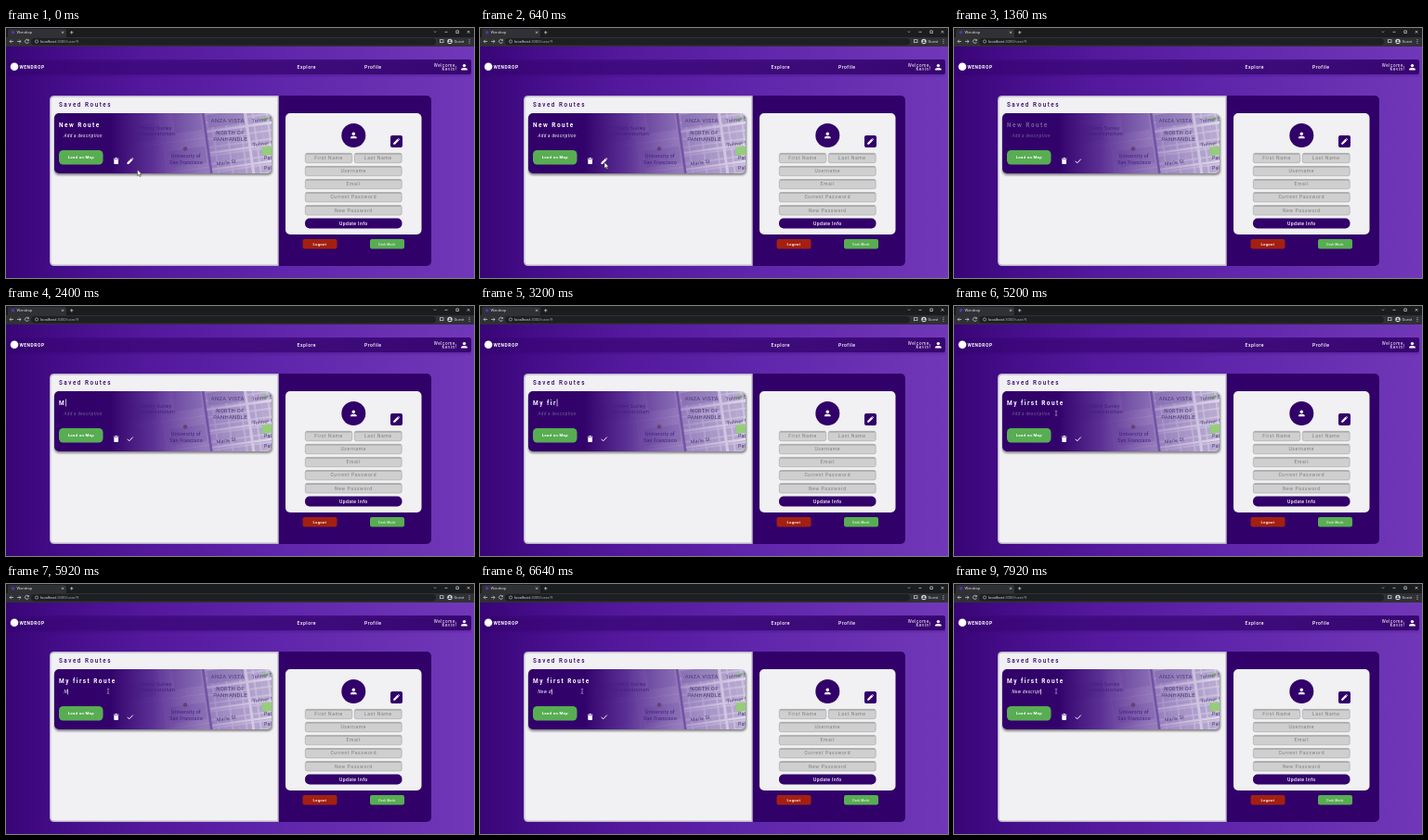
Recreate the animation shown at these times as an HTML page. Size 504 px wide and 270 px high, loop 8 s.

```html
<!DOCTYPE html>
<html lang="en">
<head>
<meta charset="utf-8">
<title>Saved Routes</title>
<style>
  html, body { margin: 0; width: 100%; height: 100%; overflow: hidden; background: #53189c; }
  svg { display: block; width: 100vw; height: 100vh; }
  text { font-family: Roboto, "Open Sans", sans-serif; fill: #fff; white-space: pre; }
  .mid { text-anchor: middle; }
  .bold { font-weight: 700; }
  .chrome { font-size: 4.2px; fill: #d6d7da; }
  .nav { font-size: 5px; font-weight: 500; letter-spacing: .55px; }
  .hello { font-size: 4.5px; letter-spacing: .65px; text-anchor: end; }
  .heading { font-size: 6.3px; font-weight: 500; letter-spacing: 1.55px; fill: #310069; }
  .title { font-size: 6.5px; font-weight: 700; letter-spacing: 1.45px; }
  .desc { font-size: 4.6px; font-style: italic; letter-spacing: .38px; }
  .field { font-size: 5px; letter-spacing: .62px; fill: #7d7d7d; text-anchor: middle; }
  .map text { font-size: 5.3px; letter-spacing: .2px; fill: #4b3a74; }
  .map .area { font-size: 5.9px; letter-spacing: .3px; }
  .map .faint { fill: #42207a; }
  .ghost { fill: #75609a; }
</style>
</head>
<body>
<svg viewBox="0 0 504 270" preserveAspectRatio="none">
  <defs>
    <linearGradient id="page">
      <stop offset="0" stop-color="#380576"/>
      <stop offset=".1" stop-color="#430c87"/>
      <stop offset=".3" stop-color="#53189c"/>
      <stop offset=".6" stop-color="#6026ab"/>
      <stop offset="1" stop-color="#7038b8"/>
    </linearGradient>
    <linearGradient id="bar">
      <stop offset="0" stop-color="#310069" stop-opacity=".2"/>
      <stop offset="1" stop-color="#310069" stop-opacity=".88"/>
    </linearGradient>
    <linearGradient id="fade">
      <stop offset="0" stop-color="#310069"/>
      <stop offset=".26" stop-color="#33036c"/>
      <stop offset=".45" stop-color="#4c1c8b" stop-opacity=".88"/>
      <stop offset=".68" stop-color="#6a43a3" stop-opacity=".56"/>
      <stop offset="1" stop-color="#7d5bb0" stop-opacity=".14"/>
    </linearGradient>
    <pattern id="blocks" width="15" height="9" patternUnits="userSpaceOnUse">
      <rect width="15" height="9" fill="#e6e2ee"/>
      <rect x=".7" y=".7" width="13.6" height="7.6" fill="#c3bad7"/>
      <path d="M7.5 1V8" stroke="#d4cde2" stroke-width=".5"/>
    </pattern>
    <clipPath id="card"><rect x="52" y="92" width="234" height="65" rx="5"/></clipPath>
    <filter id="soft" x="-10%" y="-20%" width="120%" height="150%"><feGaussianBlur stdDeviation="1.3"/></filter>
    <g id="person">
      <circle cy="-1.7" r="1.7"/>
      <path d="M-3.3 3.2V2.2C-3.3 .2 3.3 .2 3.3 2.2V3.2Z"/>
    </g>
    <path id="pencil" d="M-3.2 3.2V1.6L1.2 -2.8L2.8 -1.2L-1.6 3.2ZM1.7 -3.2L2.3 -3.7L3.7 -2.3L3.2 -1.7Z"/>
  </defs>

  <rect y="19" width="504" height="251" fill="url(#page)"/>

  <!-- browser -->
  <rect width="504" height="20" fill="#1b1c1e"/>
  <path d="M2 10V3Q2 1 4 1H63Q65 1 65 3V10H504V20H0V10Z" fill="#303134"/>
  <rect x="27" y="11" width="436" height="7.4" rx="3.7" fill="#1e1f22"/>
  <circle cx="7.5" cy="4.8" r="1.8" fill="#5b32b4"/>
  <text class="chrome" x="11.5" y="6.3">Wendrop</text>
  <g fill="none" stroke="#d6d7da" stroke-width=".7">
    <path d="M60 3.6l2.2 2.2m0-2.2l-2.2 2.2M69 4.8h3.4m-1.7-1.7v3.4M8 14.5H4m1.8-1.8L4 14.5l1.8 1.8"/>
    <path d="M12 14.5h4m-1.8-1.8l1.8 1.8l-1.8 1.8"/>
    <path d="M24.2 13.3a2 2 0 1 0 .2 1.7m0-2.8v1.4h-1.5"/>
    <path d="M461 3.6l1 1l1-1M472.5 4.3h3M484.8 2.9h2.6v2.6h-2.6ZM496.7 2.9l2.7 2.7m0-2.7l-2.7 2.7"/>
    <rect x="467.5" y="12.7" width="3.5" height="3"/>
  </g>
  <circle cx="33" cy="14.5" r="1.6" fill="none" stroke="#c5c6ca" stroke-width=".6"/>
  <text class="chrome" x="37" y="16">localhost<tspan fill="#a5a6aa">:3000/user/9</tspan></text>
  <circle cx="478" cy="14.5" r="2.7" fill="#d6d7da"/>
  <use href="#person" transform="translate(478 14.5) scale(.5)" fill="#303134"/>
  <text class="chrome" x="482.5" y="16">Guest</text>
  <path d="M499 12.3v.9m0 .9v.9m0 .9v.9" stroke="#d6d7da" stroke-width=".9"/>

  <!-- site header -->
  <rect x="2" y="36" width="499" height="16" fill="#310069" opacity=".25" filter="url(#soft)"/>
  <rect x="2" y="34" width="499" height="16" rx="2" fill="url(#bar)"/>
  <circle cx="9" cy="41.7" r="4.3" fill="#fff"/>
  <text class="bold" x="14.5" y="43.5" font-size="4.8" letter-spacing=".6">WENDROP</text>
  <text class="nav" x="313.5" y="43.8">Explore</text>
  <text class="nav" x="386" y="43.8">Profile</text>
  <text class="hello" x="485.5" y="41.6">Welcome,</text>
  <text class="hello" x="485.5" y="46.4">Kevin!</text>
  <use href="#person" x="493.5" y="42.3" fill="#fff"/>

  <!-- panels -->
  <rect x="47" y="73" width="411" height="184" rx="5" fill="#310069"/>
  <path d="M293 73.7H52Q47.7 73.7 47.7 78V252Q47.7 256.3 52 256.3H293Z" fill="#f1f0f3" stroke="#bdb8c8" stroke-width="1.4"/>
  <text class="heading" x="57" y="84.7">Saved Routes</text>

  <!-- route card -->
  <rect x="52" y="94" width="235" height="65" rx="5" fill="#000" opacity=".45" filter="url(#soft)"/>
  <g class="map" clip-path="url(#card)">
    <g transform="rotate(-8 240 125)">
      <rect x="40" y="70" width="178" height="120" fill="#c3b9d6"/>
      <rect x="218" y="70" width="92" height="120" fill="url(#blocks)"/>
      <path d="M130 92h34v18h-34ZM184 84h30v22h-30ZM176 124h38v18h-38ZM221 91h39v14h-39Z" fill="#ac9fc8"/>
      <path d="M170 70V190M40 115H217M40 147H217" stroke="#d9d2e6"/>
      <path d="M262 70V190" stroke="#f1eff5" stroke-width="3"/>
      <path d="M218 109H310M218 132H310M218 150H310" stroke="#f1eff5" stroke-width="2.3"/>
      <path d="M217 70V190" stroke="#7a62a8" stroke-width="2.6"/>
      <path d="M274 135h14v8h-14ZM278 102h9v3h-9Z" fill="#9fd28a"/>
    </g>
    <rect x="52" y="92" width="234" height="65" fill="url(#fade)"/>
    <path d="M276 128h11v9h-11Z" fill="#95d076" opacity=".85"/>
    <text class="faint mid" x="162" y="109.8">Henry Sunley</text>
    <text class="faint mid" x="162" y="116.3">Conservatorium</text>
    <text class="faint mid" x="194" y="139.8">University of</text>
    <text class="faint mid" x="194" y="146.7">San Francisco</text>
    <circle cx="193" cy="130.5" r="2.3" fill="#694071"/>
    <text class="area mid" x="238.8" y="101.8">ANZA VISTA</text>
    <text class="area mid" x="241.5" y="115.3">NORTH OF</text>
    <text class="area mid" x="241.5" y="122">PANHANDLE</text>
    <text transform="translate(265 102.5) rotate(-8)">Tolmer St</text>
    <text transform="translate(266 128.5) rotate(-8)">Tolmer St</text>
    <text transform="translate(227 148.5) rotate(-8)">Marle St</text>
    <text x="278" y="141.5">Pal</text>
    <text x="278" y="153">Pal</text>
  </g>
  <text class="title" id="title" x="57" y="107"></text>
  <text class="desc" id="desc" x="62.5" y="118"></text>
  <rect id="caret" width=".7" fill="#fff"/>
  <rect x="57" y="132" width="47.5" height="15.5" rx="4.5" fill="#58ad52"/>
  <text class="bold mid" x="80.8" y="141.3" font-size="4.3" letter-spacing=".3">Load on Map</text>
  <path d="M116.3 142h4.7v4.3q0 .8-.8.8h-3.1q-.8 0-.8-.8ZM115.8 140.7h1.6l.5-.6h1.5l.5.6h1.6v.8h-5.7Z" fill="#fff"/>
  <use id="edit" href="#pencil" x="133.7" y="143.7" fill="#fff"/>
  <path id="check" d="M130.7 143.8l2 2l4-4.2" fill="none" stroke="#fff" stroke-width="1"/>

  <!-- account -->
  <rect x="301" y="92" width="146.5" height="131" rx="5" fill="#f1f0f3"/>
  <circle cx="374.3" cy="116" r="13" fill="#310069"/>
  <use href="#person" x="374.3" y="116" fill="#fff"/>
  <rect x="414" y="116" width="13" height="13" rx="2" fill="#310069"/>
  <use href="#pencil" x="420.4" y="122.6" fill="#fff"/>
  <g id="fields"></g>
  <rect x="322" y="205.5" width="104.5" height="11" rx="5" fill="#310069"/>
  <text class="mid" x="374.3" y="212.8" font-size="5" font-weight="500" letter-spacing=".42">Update Info</text>
  <rect x="319.5" y="228" width="37" height="10.5" rx="2" fill="#a32011"/>
  <text class="mid" x="337.8" y="234.8" font-size="4.3" font-weight="500" letter-spacing=".15">Logout</text>
  <rect x="392" y="228" width="37" height="10.5" rx="2" fill="#58ad52"/>
  <text class="mid" x="410.5" y="234.5" font-size="3.5" letter-spacing=".15">Dark Mode</text>

  <path id="arrow" d="M0 0V6.6L1.6 5.2L2.7 7.6L3.7 7.1L2.6 4.8H4.7Z" fill="#fff" stroke="#222" stroke-width=".5"/>
  <path id="beam" d="M-1.2 -2.6Q0 -2.6 0 -2Q0 -2.6 1.2 -2.6M0 -2V2M-1.2 2.6Q0 2.6 0 2Q0 2.6 1.2 2.6" fill="none" stroke="#e8e2f2" stroke-width=".5"/>
</svg>
<script>
const LOOP = 8000, STEP = 80, EDIT_AT = 720;
const el = id => document.getElementById(id);

const title = { node: el('title'), hint: 'New Route', text: 'My first Route',
  focus: 1760, blur: 5440, start: 2310, pace: 178, top: 100.5, height: 8 };
const desc = { node: el('desc'), hint: 'Add a description', text: 'New descript',
  focus: 5440, blur: LOOP, start: 5880, pace: 180, top: 113.5, height: 5.8 };

function addField(label, x, y, w) {
  el('fields').insertAdjacentHTML('beforeend',
    `<rect x="${x + .3}" y="${y + .3}" width="${w - .6}" height="10.4" rx="2" fill="#cfcfcf" stroke="#a3a3a3" stroke-width=".6"/>
     <path d="M${x + 1} ${y + 1}H${x + w - 1}" stroke="#8b8b8b" stroke-width=".7"/>
     <text class="field" x="${x + w / 2}" y="${y + 7.2}">${label}</text>`);
}
addField('First Name', 322, 135, 51);
addField('Last Name', 375, 135, 51.5);
['Username', 'Email', 'Current Password', 'New Password']
  .forEach((label, i) => addField(label, 322, 149 + 14.1 * i, 104.5));

const show = (node, on) => node.setAttribute('visibility', on ? 'visible' : 'hidden');

function glide(t, from, to, a, b) {
  const p = Math.min(1, Math.max(0, (t - from) / (to - from)));
  const e = p * p * (3 - 2 * p);
  return a.map((v, i) => v + (b[i] - v) * e);
}

function place(node, [x, y], on) {
  node.setAttribute('transform', `translate(${x} ${y})`);
  show(node, on);
}

// Draws one editable line; returns whether its caret is lit.
function drawEntry(f, t) {
  const count = Math.min(f.text.length, Math.max(0, Math.floor((t - f.start) / f.pace) + 1));
  const typed = f.text.slice(0, count);
  f.node.textContent = typed || f.hint;
  f.node.classList.toggle('ghost', !typed && t >= EDIT_AT);
  if (t < f.focus || t >= f.blur) return false;

  const lastKey = count ? f.start + (count - 1) * f.pace : f.focus;
  const caret = el('caret');
  caret.setAttribute('x', +f.node.getAttribute('x') + (typed ? f.node.getComputedTextLength() : 0));
  caret.setAttribute('y', f.top);
  caret.setAttribute('height', f.height);
  return (t - lastKey) % 1060 < 530;
}

function draw(t) {
  const inTitle = drawEntry(title, t), inDesc = drawEntry(desc, t);
  show(el('caret'), inTitle || inDesc);
  show(el('edit'), t < EDIT_AT);
  show(el('check'), t >= EDIT_AT);

  const arrowAt = t < EDIT_AT
    ? glide(t, 80, 560, [141.5, 153], [134, 145])
    : glide(t, 800, 1200, [134, 145], [98, 110]);
  place(el('arrow'), arrowAt, t < 1200);
  place(el('beam'), glide(t, 4880, 5120, [98, 106], [110, 115.8]), t >= 4880);
}

function tick(now) {
  draw(Math.floor((now % LOOP) / STEP) * STEP);
  requestAnimationFrame(tick);
}
draw(0);
requestAnimationFrame(tick);
</script>
</body>
</html>
```
